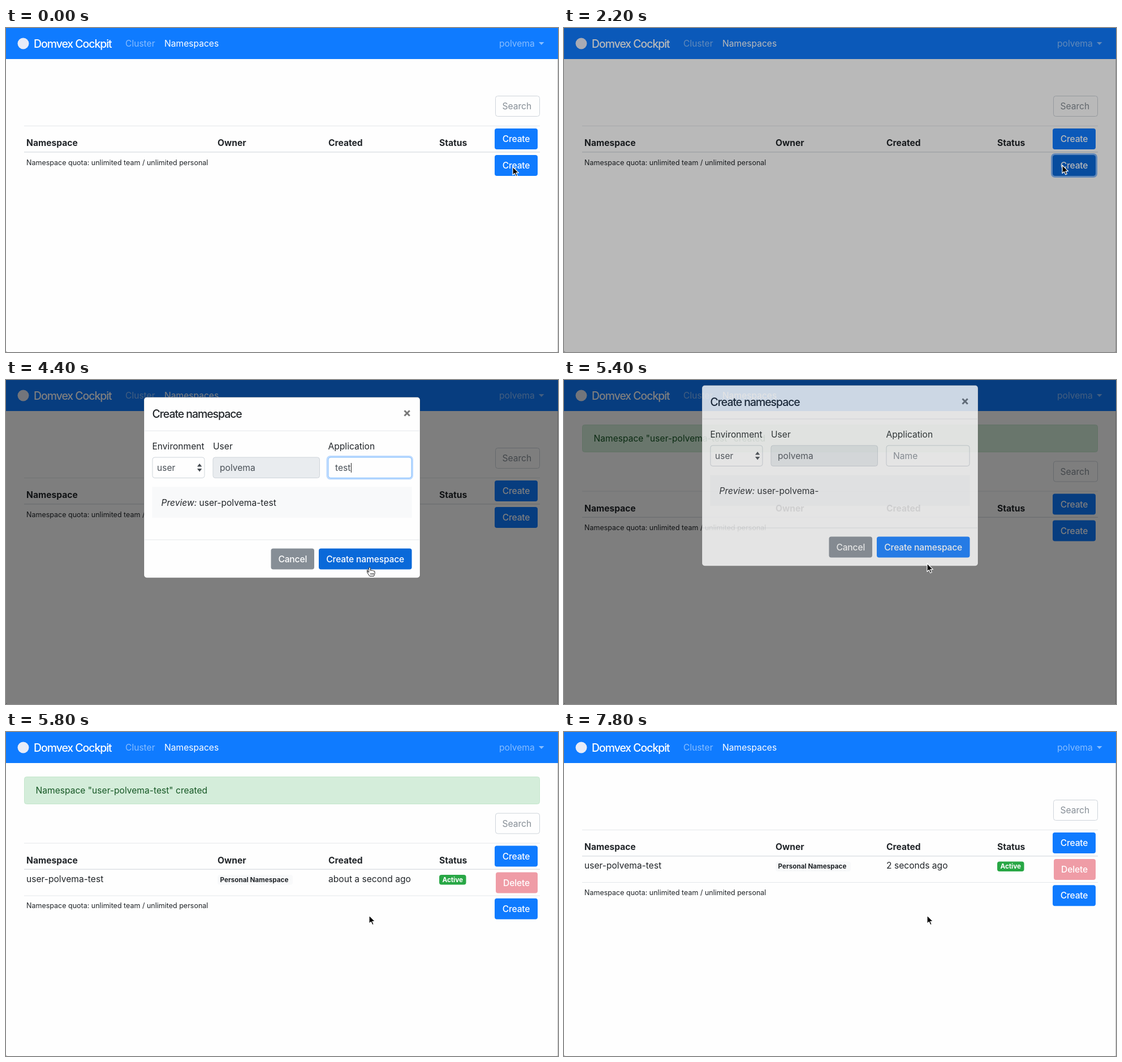
An HTML page that plays this animation: 976x574 px, repeating every 8 s.

```html
<!DOCTYPE html>
<html lang="en">
<head>
<meta charset="utf-8">
<title>Namespace console</title>
<style>
  html, body { margin: 0; width: 100%; height: 100%; overflow: hidden; background: #a8a8a8; }
  svg { display: block; width: 976px; height: 574px; }
  text { font: 400 15.6px Inter, "Open Sans", sans-serif; font-optical-sizing: none; fill: #212529; white-space: pre; }
  .brand, .title { font-size: 19.5px; font-weight: 500; letter-spacing: -.055em; }
  .white, .brand { fill: #fff; }
  .faded { fill: #fff; fill-opacity: .5; }
  .head { font-weight: 700; }
  .small { font-size: 12.5px; }
  .badge { font-size: 11.7px; font-weight: 700; }
  .button { fill: #fff; font-weight: 500; letter-spacing: -.01em; text-anchor: middle; }
  .hint { fill: #868e96; }
  .value { fill: #495057; }
  .field { fill: #fefefe; stroke: #ced4da; }
  .blue { fill: #0f7bff; }
  .rule { stroke: #e4e7ea; }
</style>
</head>
<body>
<svg viewBox="0 0 976 574">
  <path d="M0 0H976V571Q976 574 973 574H3Q0 574 0 571Z" fill="#fefefe"/>
  <path d="M975.5 55V572" stroke="#c8c8c8"/>

  <rect class="blue" width="976" height="55"/>
  <circle cx="30.5" cy="27.5" r="10" fill="#e8ecf8"/>
  <text class="brand" x="49" y="34.5">Domvex Cockpit</text>
  <text class="faded" x="211" y="33.4">Cluster</text>
  <text class="white" x="280" y="33.4">Namespaces</text>
  <text class="faded" x="872" y="33.4" data-user></text>
  <path class="faded" d="M942 25H951.5L946.75 30Z"/>

  <g id="alert">
    <rect x="32.5" y="79.5" width="911" height="48" rx="4" fill="#d4edda" stroke="#c3e6cb"/>
    <text x="52.5" y="109" style="fill:#155724">Namespace "<tspan data-space></tspan>" created</text>
  </g>

  <g id="content">
    <rect class="field" x="865.5" y="120.5" width="78" height="36" rx="4"/>
    <text class="hint" x="877.5" y="144.3">Search</text>
    <path class="rule" d="M32 173.5H944"/>
    <text class="head" x="36" y="209">Namespace</text>
    <text class="head" x="374" y="209">Owner</text>
    <text class="head" x="570" y="209">Created</text>
    <text class="head" x="766" y="209">Status</text>
    <rect class="blue" x="864" y="178" width="76" height="37" rx="4"/>
    <text class="button" x="902" y="202.3">Create</text>
    <path d="M32 219.7H944" stroke="#dee2e6" stroke-width="1.6"/>

    <g id="row">
      <text x="36" y="242.3" data-space></text>
      <rect x="374" y="229.5" width="133" height="17.5" rx="4" fill="#f8f9fa"/>
      <text class="badge" x="378.5" y="242.4">Personal Namespace</text>
      <text id="age" x="570" y="242.3"></text>
      <rect x="766" y="229.5" width="47.5" height="17.5" rx="4" fill="#28a745"/>
      <text class="badge white" x="789.7" y="242.3" text-anchor="middle">Active</text>
      <rect x="866" y="225" width="74" height="37" rx="4" fill="#ef9ca6"/>
      <text class="button" x="902.5" y="249.2">Delete</text>
      <path class="rule" d="M32 266.5H944"/>
    </g>

    <g id="quota">
      <text class="small" x="36" y="242.5">Namespace quota: unlimited team / unlimited personal</text>
      <rect id="openRing" x="862.5" y="223.5" width="79" height="40" rx="5.5" fill="none" stroke="#0f7bff" stroke-opacity=".5" stroke-width="3"/>
      <rect id="openButton" x="864" y="225" width="76" height="37" rx="4"/>
      <text class="button" x="902" y="249.2">Create</text>
    </g>
  </g>

  <rect id="dim" width="976" height="574"/>

  <g id="modal">
    <rect x="244" y="30.5" width="488" height="320" rx="5" fill="#fefefe" stroke="#000" stroke-opacity=".2"/>
    <text class="title" x="258.5" y="66.7">Create namespace</text>
    <path d="M704.5 54.3L713.7 63.5M713.7 54.3L704.5 63.5" stroke="#777" stroke-width="3"/>
    <path class="rule" d="M244 90H732M244 283H732"/>
    <text x="258.5" y="122.8">Environment</text>
    <text x="366" y="122.8">User</text>
    <text x="569.5" y="122.8">Application</text>
    <rect class="field" x="259" y="137" width="92" height="36.5" rx="4"/>
    <text class="value" x="267" y="161.2">user</text>
    <path d="M338 153.5H346.4L342.2 148Zm0 3.5H346.4L342.2 162.5Z" fill="#444a50"/>
    <rect x="366" y="137" width="188.5" height="36.5" rx="4" fill="#e9ecef" stroke="#ced4da"/>
    <text class="value" x="378" y="161.2" data-user></text>
    <rect id="nameRing" x="568" y="135.5" width="150.5" height="39.5" rx="5.5" fill="none" stroke="#0f7bff" stroke-opacity=".28" stroke-width="3"/>
    <rect id="nameField" class="field" x="570" y="137" width="147" height="36.5" rx="4"/>
    <text id="name" x="582" y="161.2"></text>
    <rect id="caret" y="147" width="1" height="17" fill="#222"/>
    <rect x="258.5" y="189.5" width="459" height="54.5" fill="#f8f9fa"/>
    <text x="274.5" y="222.7" font-style="italic" style="font-style:italic">Preview:</text>
    <text id="preview" x="341.5" y="222.7"></text>
    <rect x="468.5" y="298.5" width="76.5" height="37" rx="4" fill="#868e96"/>
    <text class="button" x="506.8" y="322.7">Cancel</text>
    <rect id="submit" x="553" y="298.5" width="164.5" height="37" rx="4"/>
    <text class="button" x="635.2" y="322.7">Create namespace</text>
  </g>

  <g id="cursor" stroke-linejoin="round">
    <path id="arrow" d="M0 0V14.5L3.4 11.4 5.8 16.8 8.2 15.7 5.9 10.6H10.5Z" stroke="#fff" stroke-width="1.2"/>
    <path id="beam" d="M-3-7.5Q0-7.5 0-5Q0-7.5 3-7.5M0-5V5M-3 7.5Q0 7.5 0 5Q0 7.5 3 7.5M-1.5 2H1.5" fill="none" stroke="#111" stroke-width="1.3"/>
    <path id="hand" d="M-1.4 1.2Q0-.8 1.4 1.2V6Q3 4.7 4.2 6.3Q5.6 5.3 6.8 6.9Q9 6.2 9 8.5V11.5L7.5 16H0L-4.2 9.8Q-4-.0-4 8.4Q-2.8 7.4-1.4 9.4ZM2 10.5V13.5M4.3 10.5V13.5M6.5 10.5V13.5" fill="#fff" stroke="#222"/>
  </g>
</svg>
<script>
const LOOP = 8000, STEP = 200;
const USER = "polvema", APP = "test";
const BLUE = "#0f7bff", HOVER = "#0a69d9", PALE = "#67aaff";
const $ = id => document.getElementById(id);

// Held values: [start ms, value]
const tracks = {
  dim: [[0, 0], [2200, .275], [2400, .5], [5800, 0]],
  modalAlpha: [[0, 0], [2400, .83], [2600, 1], [5400, .8], [5600, 0]],
  modalY: [[0, -30], [2600, 0], [5400, -21]],
  openColor: [[0, BLUE], [1400, HOVER], [2400, BLUE]],
  openFocus: [[0, 0], [2000, 1], [2400, 0]],
  nameFocus: [[0, 0], [3200, 1], [5400, 0]],
  typed: [[0, 0], [3400, 1], [3600, 2], [3800, 3], [4000, 4], [5400, 0]],
  submitColor: [[0, PALE], [3400, BLUE], [4400, HOVER], [5400, BLUE]],
  alert: [[0, 0], [5400, 1], [7000, 0]],
  row: [[0, 0], [5600, 1]],
  age: [[0, "about a second ago"], [7000, "2 seconds ago"]],
  pointer: [[0, "arrow"], [3000, "beam"], [3400, ""], [4000, "beam"], [4200, "arrow"], [4400, "hand"], [5400, "arrow"]]
};

// Pointer path: [ms, x, y]
const path = [
  [0, 896, 246], [400, 896, 246], [1400, 881, 243], [2200, 881, 243],
  [2400, 866, 236], [2800, 690, 172], [3000, 636.5, 154.5],
  [4000, 636.5, 154.5], [4400, 643, 331.5], [5200, 643, 331.5],
  [5400, 642, 325], [LOOP, 642, 325]
];

const held = (track, t) => track.filter(([start]) => start <= t).pop()[1];

function pointerAt(t) {
  const i = path.findIndex(([time]) => time > t);
  const [t0, x0, y0] = path[i - 1], [t1, x1, y1] = path[i];
  const k = (t - t0) / (t1 - t0), e = k * k * (3 - 2 * k);
  return [x0 + (x1 - x0) * e, y0 + (y1 - y0) * e];
}

const show = (id, on) => { $(id).style.display = on ? "" : "none"; };
const move = (id, x, y) => $(id).setAttribute("transform", `translate(${x} ${y})`);
const fill = (id, color) => { $(id).style.fill = color; };

function draw(t) {
  const s = {};
  for (const key in tracks) s[key] = held(tracks[key], t);

  show("alert", s.alert);
  move("content", 0, s.alert ? 23.5 : 0);
  show("row", s.row);
  $("age").textContent = s.age;
  move("quota", 0, s.row ? 46.3 : 0);
  fill("openButton", s.openColor);
  show("openRing", s.openFocus);

  $("dim").style.opacity = s.dim;
  $("modal").style.opacity = s.modalAlpha;
  move("modal", 0, s.modalY);

  const text = APP.slice(0, s.typed);
  $("name").textContent = text || "Name";
  fill("name", text ? "#495057" : "#868e96");
  $("preview").textContent = `user-${USER}-${text}`;
  $("nameField").style.stroke = s.nameFocus ? "#80bdff" : "";
  show("nameRing", s.nameFocus);
  show("caret", s.nameFocus);
  $("caret").setAttribute("x", 582 + (text ? $("name").getComputedTextLength() + .5 : 0));
  fill("submit", s.submitColor);

  move("cursor", ...pointerAt(t));
  for (const kind of ["arrow", "beam", "hand"]) show(kind, kind === s.pointer);
}

document.querySelectorAll("[data-user]").forEach(el => { el.textContent = USER; });
document.querySelectorAll("[data-space]").forEach(el => { el.textContent = `user-${USER}-${APP}`; });

const origin = performance.now();
function tick() {
  const t = (performance.now() - origin) % LOOP;
  draw(Math.floor(t / STEP) * STEP);
  requestAnimationFrame(tick);
}
tick();
</script>
</body>
</html>
```
